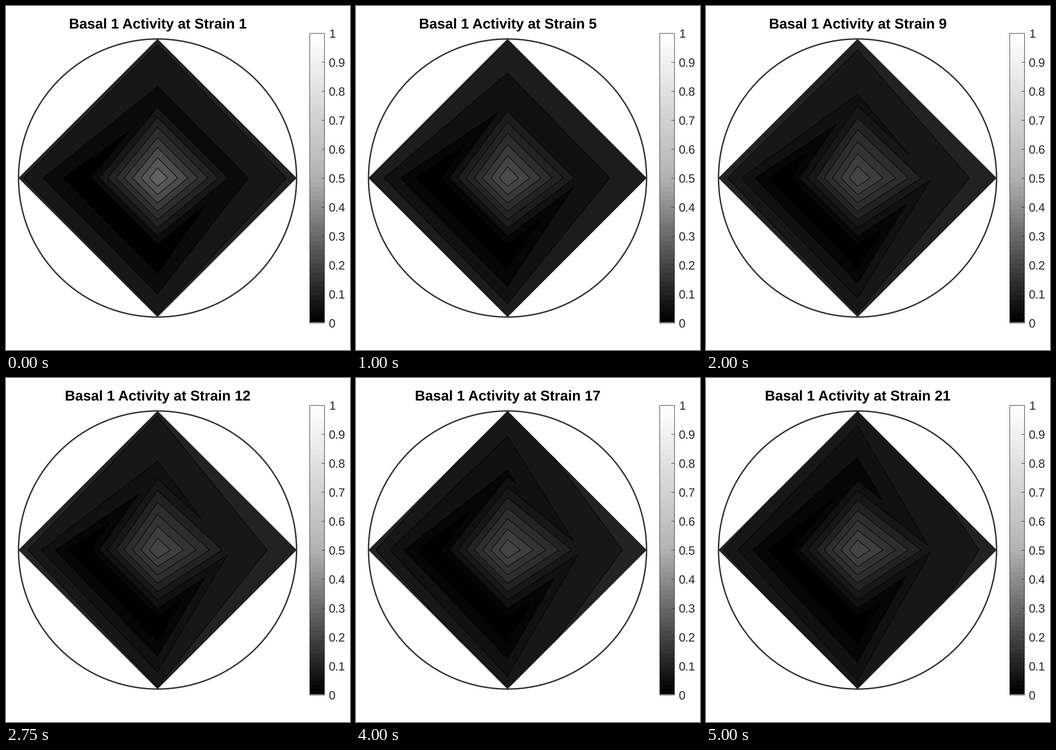
A matplotlib script for the animation above (5.25 s loop, 748 px wide and 748 px high).

```python
import numpy as np
import matplotlib.pyplot as plt
from matplotlib.animation import FuncAnimation
from matplotlib.patches import Circle, Polygon, Rectangle

SIZE, DPI, STRAINS = 748, 100, 21
CX, CY = 329.5, 374
R_MID, R_OUT = 163, 302.3
BANDS, SHADES = 9, 64
INK = "#262626"

plt.rcParams["font.family"] = "Liberation Sans"
plt.rcParams["text.hinting"] = "none"


def px(n):
    """Pixels to points."""
    return n * 72 / DPI


def shade(value):
    """Gray for an activity of 0..1: steep up to one half, then gentle."""
    index = np.minimum(np.floor(value * SHADES), SHADES - 1)
    return np.interp(index / (SHADES - 1), [0, 0.5, 1], [0, 0.7, 1])


def rise(s, top, slope, drop, mid, width):
    """S-shaped rise onto a slowly falling line."""
    return top - slope * s - drop / (1 + np.exp((s - mid) / width))


def activity(s):
    """Grid values in contour steps; the centre is always BANDS steps high."""
    mid_n = 2.13 + 0.69 * np.cos(np.pi * (s - 9.8) / 11.4)
    mid_e = rise(s, 3.45, 0.017, 2.0, 5.3, 1.7)
    rim_ns = rise(s, 4.972, 0.072, 1.9, 4.6, 1.4)
    rim_ew = rise(s, 5.22, 0.042, 2.1, 4.95, 1.7)
    return np.array([[BANDS] * 5,
                     [mid_e, mid_n, 0, 0, mid_e],
                     [rim_ew, rim_ns, rim_ew, rim_ns, rim_ew]])


# Polar grid: centre, middle ring, rim; columns run E, N, W, S, E
cos = np.array([1, 0, -1, 0, 1])
sin = np.array([0, 1, 0, -1, 0])
radii = np.array([[0], [R_MID], [R_OUT]])
X, Y = CX + radii * cos, CY - radii * sin

fig = plt.figure(figsize=(SIZE / DPI, SIZE / DPI), dpi=DPI, facecolor="white")
ax = fig.add_axes([0, 0, 1, 1])
ax.axis("off")

# Colour bar
LEFT, RIGHT, TOP, BOTTOM = 660.5, 692.5, 58.5, 688.5
ramp = shade((np.arange(SHADES)[::-1, None] + 0.5) / SHADES)
ax.imshow(ramp, cmap="gray", vmin=0, vmax=1, extent=(LEFT, RIGHT, BOTTOM, TOP),
          aspect="auto", interpolation="nearest")
ax.add_patch(Rectangle((LEFT, TOP), RIGHT - LEFT, BOTTOM - TOP, fill=False,
                       ec=INK, lw=px(1)))
for k in range(11):
    y = BOTTOM - (BOTTOM - TOP) * k / 10
    ax.plot([RIGHT - 6, RIGHT], [y, y], color=INK, lw=px(1))
    ax.text(702, y + 10, f"{k / 10:g}", size=px(26), color=INK, va="baseline")

ax.add_patch(Circle((CX, CY), R_OUT, fill=False, ec="#303030", lw=px(3)))
ax.add_patch(Polygon(np.c_[X[2, :4], Y[2, :4]], fc="#161616", lw=0, zorder=1.5))
title = ax.text(330, 49, "", size=px(31), weight="bold", color="black",
                ha="center", va="baseline")

drawn = []


def draw(i):
    while drawn:
        drawn.pop().remove()
    strain = i + 1
    Z = activity(strain)
    step = 0.025 + 0.009 * np.exp(-i / 2.5)
    grays = [str(g) for g in shade(np.arange(BANDS) * step)]
    drawn.append(ax.contourf(X, Y, Z, levels=range(BANDS + 1), colors=grays,
                             antialiased=True, zorder=2))
    drawn.append(ax.contour(X, Y, Z, levels=range(1, BANDS), colors="black",
                            linewidths=px(1.1), zorder=3))
    title.set_text(f"Basal 1 Activity at Strain {strain}")
    ax.set(xlim=(0, SIZE), ylim=(SIZE, 0))
    return []


anim = FuncAnimation(fig, draw, frames=STRAINS, interval=250, repeat=True,
                     repeat_delay=0, init_func=lambda: [])
plt.show()
```
